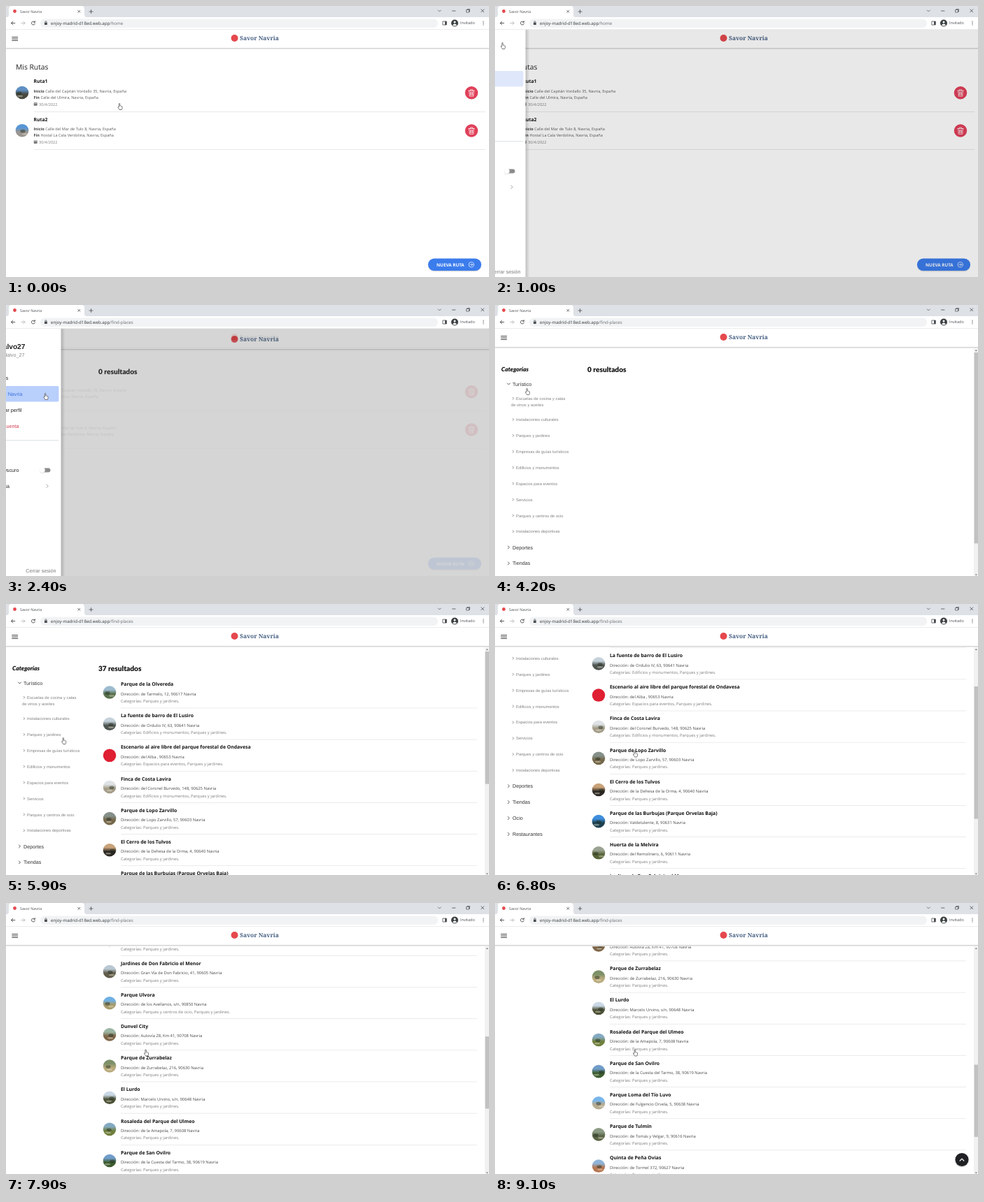
Animation of 690x388 px, one loop 9.2 s. Source, as an HTML page:

```html
<!DOCTYPE html>
<html lang="es">
<head>
<meta charset="utf-8">
<style>
html, body { margin: 0; width: 100%; height: 100%; overflow: hidden; background: #fff; }
svg { display: block; width: 690px; height: 388px; font-family: "Open Sans", "Noto Sans", sans-serif; text-rendering: geometricPrecision; }
.side { font-family: "Liberation Sans", Arial, sans-serif; }
.head { font-family: Lato, sans-serif; font-weight: 900; }
.brand { font-family: "Noto Serif", serif; font-weight: 700; }
.line { fill: none; stroke-linecap: round; stroke-linejoin: round; }
</style>
</head>
<body>
<svg id="stage" viewBox="0 0 690 388" xmlns="http://www.w3.org/2000/svg"></svg>
<script>
const LOOP = 9200;
const CITY = 'Navria';
const APP = 'Savor ' + CITY;
const VIEW = 327, TRACK = 316, ROW = 45.15;

// y is the visual middle of the text
const text = (x, y, str, size, fill = '#222', attrs = '') =>
  `<text x="${x}" y="${(y + size * .36).toFixed(2)}" font-size="${size}" fill="${fill}" ${attrs}>${str}</text>`;
const rect = (x, y, w, h, fill, attrs = '') =>
  `<rect x="${x}" y="${y}" width="${w}" height="${h}" fill="${fill}" ${attrs}/>`;
const circle = (x, y, r, fill, attrs = '') => `<circle cx="${x}" cy="${y}" r="${r}" fill="${fill}" ${attrs}/>`;
const line = (d, stroke, width = .8, attrs = '') =>
  `<path class="line" d="${d}" stroke="${stroke}" stroke-width="${width}" ${attrs}/>`;
const group = (id, body, attrs = '') => `<g id="${id}" ${attrs}>${body}</g>`;
const BOLD = 'font-weight="700" ';

let photoCount = 0;
function photo(x, y, sky, ground) {
  const n = photoCount++, id = 'photo' + n;
  const trees = sky === ground ? '' :
    `<ellipse cx="${x - 4 + n * 5 % 9}" cy="${y + 1}" rx="3.6" ry="2.4" fill="#1d2618" opacity=".45"/>` +
    `<ellipse cx="${x - 3 + n * 7 % 8}" cy="${y + 5}" rx="4" ry="1.3" fill="#f1ead8" opacity=".4"/>`;
  return `<linearGradient id="${id}" x2="0" y2="1"><stop offset=".3" stop-color="${sky}"/>` +
    `<stop offset=".62" stop-color="${ground}"/></linearGradient>` + circle(x, y, 9.3, `url(#${id})`) + trees;
}

function browser() {
  const ink = '#4a4d51';
  return rect(0, 0, 690, 17, '#dee1e6') +
    '<path d="M1 16Q4 16 4 12V4Q4 0 8 0H108Q112 0 112 4V12Q112 16 115 16Z" fill="#fff"/>' +
    rect(0, 16, 690, 18, '#fff') + rect(0, 33.3, 690, .7, '#e4e4e6') +
    circle(12.5, 7.5, 2.4, '#e5484d') + text(20, 7.8, APP, 5.3, '#4a4d51') +
    line('M102.8 6.3l3 3m0-3l-3 3', ink) + line('M119 8h5M121.5 5.5v5', ink) +
    line('M617.3 6l2 2l2-2', ink, .7) + line('M637.5 7h4.5', ink) +
    line('M658 5.5h3.5v3.5h-3.5zM659 5.5v-1h3.5v3.5h-1', ink, .7) +
    line('M678.8 4.8l4 4m0-4l-4 4', ink) +
    line('M12.8 24.5h-5.2m2.3-2.4l-2.4 2.4l2.4 2.4', ink, .9) +
    line('M21.8 24.5h5.2m-2.3-2.4l2.4 2.4l-2.4 2.4', '#b9bbbe', .9) +
    line('M41 23a2.5 2.5 0 1 0 .4 2.2M41.4 21.6v1.7h-1.7', ink, .9) +
    rect(49, 18.5, 568, 12.5, '#f1f3f4', 'rx="6.2"') +
    rect(55, 23.8, 3.8, 3.2, ink, 'rx=".5"') + line('M55.8 23.8v-1a1.1 1.1 0 0 1 2.2 0v1', ink, .7) +
    text(64, 24.5, 'enjoy-madrid-d18ed.web.app<tspan id="path" fill="#686b70"></tspan>', 6.15, '#33363a') +
    line('M624.3 22h5v5h-5z', ink) + rect(627, 22, 2.5, 5, ink) +
    circle(641, 24.5, 5, '#3c4043') + circle(641, 23, 1.5, '#fff') +
    '<path d="M638 27.5q3-4 6 0q-3 2-6 0z" fill="#fff"/>' +
    text(649, 24.5, 'Invitado', 5.5, '#4a4d51') +
    [22.2, 24.5, 26.8].map(y => circle(682, y, .65, ink)).join('');
}

function header() {
  return rect(0, 34, 690, 26.5, '#fff') + rect(0, 60, 690, 1, '#d2d2d2') + rect(0, 61, 690, 1.2, '#ededed') +
    line('M8.7 44.6h8M8.7 47h8M8.7 49.4h8', '#333', .9) +
    circle(326.5, 46, 5, '#e5484d') + text(334, 46.2, APP, 8.4, '#435d80', 'class="brand"');
}

function route(dy, name, from, to, sky, ground) {
  const label = (y, key, value) =>
    text(39.5, y, `<tspan ${BOLD} fill="#444">${key}</tspan> ${value}, ${CITY}, España`, 5.6, '#5c5c5c');
  return `<g transform="translate(0 ${dy})">` + photo(23, 124, sky, ground) +
    text(39.5, 108, name, 6.8, '#111', BOLD) + label(122, 'Inicio', from) + label(131, 'Fin', to) +
    rect(39.7, 138.2, 5, 4.6, '#777', 'rx=".7"') + rect(40.3, 139.4, 3.8, .5, '#fff') +
    text(47, 141, '30/4/2022', 5.6, '#808080') + rect(40, 151, 645, .7, '#dedede') +
    circle(665, 124.3, 9.2, '#e0405a') +
    line('M660.8 121.3h8.4M663.3 121.3v-1.5h3.4v1.5M661.7 121.6l.6 7.5h5.4l.6-7.5M663.6 123.3v4M665 123.3v4M666.4 123.3v4', '#fff', .75) +
    '</g>';
}

function home() {
  return rect(0, 34, 690, 354, '#fff') + text(14, 87, 'Mis Rutas', 10.3, '#222') +
    route(0, 'Ruta1', 'Calle del Capitán Vordallo 35', 'Calle del Ulmira', '#5f8fc4', '#48493f') +
    route(54.2, 'Ruta2', 'Calle del Mar de Tulo 8', 'Hostal La Cala Verdolina', '#5796d6', '#9a958f') +
    rect(603, 362.5, 76, 18, '#000', 'rx="9" opacity=".12"') + rect(603, 361.5, 76, 17.5, '#3b7cec', 'rx="8.7"') +
    text(615, 370.5, 'NUEVA RUTA', 6.3, '#fff', BOLD) +
    line('M668.4 370.3a3.7 3.7 0 1 1-7.4 0a3.7 3.7 0 1 1 7.4 0M662.8 370.3h3.8m-1.5-1.5l1.5 1.5l-1.5 1.5', '#fff', .7) +
    header();
}

const PARK = 'Parques y jardines', BUILT = 'Edificios y monumentos, ';
const EVENTS = 'Espacios para eventos, ', LEISURE = 'Parques y centros de ocio, ';
const places = [
  ['Parque de la Olvereda', 'de Tarmelo, 12, 90617', '', '#9dbbd0', '#58704a'],
  ['La fuente de barro de El Lusiro', 'de Ordulio IV, 63, 90641', BUILT, '#c5d2da', '#4d5450'],
  ['Escenario al aire libre del parque forestal de Ondavesa', 'del Alba , 90653', EVENTS, '#df1f32', '#df1f32'],
  ['Finca de Costa Lavira', 'del Coronel Burvedo, 148, 90625', BUILT, '#dfe3e6', '#a39c88'],
  ['Parque de Lopo Zarvillo', 'de Lopo Zarvillo, 57, 90603', '', '#86908a', '#75684a'],
  ['El Cerro de los Tulvos', 'de la Dehesa de la Orma, 4, 90640', '', '#c9a37a', '#2b2723'],
  ['Parque de las Burbujas (Parque Orvelas Baja)', 'Valdetulente, 8, 90631', '', '#3f8ede', '#1e4150'],
  ['Huerta de la Melvira', 'del Remolinero, 6, 90611', '', '#9aa391', '#566338'],
  ['Jardines de Don Fabricio el Menor', 'Gran Vía de Don Fabricio, 41, 90605', '', '#b9c8d3', '#625c4b'],
  ['Parque Ulvora', 'de los Avellanos, s/n, 90850', LEISURE, '#6fb0e4', '#a79a6a'],
  ['Dunvel City', 'Autovía Z8, Km 41, 90708', '', '#9cb7a4', '#7d6548'],
  ['Parque de Zurrabelaz', 'de Zurrabelaz, 216, 90630', '', '#7d9068', '#b9aa7c'],
  ['El Lurdo', 'Marcelo Urvino, s/n, 90648', '', '#cbd9e6', '#4c5136'],
  ['Rosaleda del Parque del Ulmeo', 'de la Amapola, 7, 90608', '', '#84aac2', '#6f7f3d'],
  ['Parque de San Ovilro', 'de la Cuesta del Tarmo, 38, 90619', '', '#719dcb', '#3d5c30'],
  ['Parque Loma del Tío Luvo', 'de Fulgencio Orvela, 5, 90638', '', '#78b5ea', '#b6ac91'],
  ['Parque de Tulmín', 'de Tomás y Velgar, 9, 90616', '', '#8b9a83', '#586345'],
  ['Quinta de Peña Ovias', 'de Tormel 372, 90627', '', '#8fb4d8', '#b5764f'],
];

const place = ([name, address, extra, sky, ground], i) =>
  `<g transform="translate(0 ${(115 + i * ROW).toFixed(2)})">` + photo(148, 11.5, sky, ground) +
  text(164, -.3, name, 6.85, '#111', BOLD) +
  text(164, 13.5, `Dirección: ${address} ${CITY}`, 5.85, '#484848') +
  text(164, 24, `Categorías: ${extra}${PARK}.`, 5.85, '#7c7c7c') +
  rect(164, 33.6, 509, .7, '#e3e3e3') + '</g>';

const chevron = (x, y, size = 1.8, color = '#444') =>
  line(`M${x - size / 2} ${y - size}l${size} ${size}l${-size} ${size}`, color, .9);

const kinds = ['Instalaciones culturales', PARK, 'Empresas de guías turísticos', 'Edificios y monumentos',
  'Espacios para eventos', 'Servicios', 'Parques y centros de ocio', 'Instalaciones deportivas'];

function sidebar() {
  const grey = '#828282';
  const subs = chevron(26, 133.7, 1.5, grey) + text(30, 133.7, 'Escuelas de cocina y catas', 5.85, grey) +
    text(23, 142.7, 'de vinos y aceites', 5.85, grey) +
    kinds.map((kind, i) => {
      const y = 164 + i * 22.9;
      return chevron(26, y, 1.5, grey) + text(30, y, kind, 5.85, grey);
    }).join('');
  const rest = ['Deportes', 'Tiendas', 'Ocio', 'Restaurantes'].map((kind, i) => {
    const y = 347 + i * 22.9;
    return chevron(19.5, y, 2) + text(25, y, kind, 7.2, '#333');
  }).join('');
  return text(9, 91.8, 'Categorías', 8.5, '#111', 'class="head" font-style="italic"') +
    '<g class="side">' + text(25, 113, 'Turístico', 7.2, '#333') +
    group('closed', chevron(19.5, 113, 2)) + group('opened', line('M17.5 112l2 2l2-2', '#444', .9) + subs) +
    group('rest', rest) + '</g>';
}

function finder() {
  return rect(0, 34, 690, 354, '#fff') +
    '<g clip-path="url(#content)">' + group('scroll', sidebar() +
      text(132, 92.7, '<tspan id="count"></tspan> resultados', 10.1, '#111', 'class="head"') +
      group('firstRows', places.slice(0, 10).map(place).join('')) +
      group('moreRows', places.slice(10).map((p, i) => place(p, i + 10)).join(''))) + '</g>' +
    group('bar', rect(684, 61, 6, 327, '#f1f1f1') + '<path d="M685.8 66l1.5-2l1.5 2z" fill="#777"/>' +
      '<path d="M685.8 385.5l1.5 2l1.5-2z" fill="#777"/>' +
      rect(684.6, 68, 5.4, 100, '#c1c1c1', 'id="thumb"')) +
    group('up', circle(667, 368, 10.3, '#000', 'opacity=".15"') + circle(667, 367.5, 9.5, '#202124') +
      line('M664.2 369l2.8-2.8l2.8 2.8', '#fff', 1.2)) +
    header();
}

function menu() {
  const end = 'text-anchor="end"';
  const item = (x, y, label, fill = '#222', attrs = '') => text(x, y, label, 7.2, fill, attrs + end);
  return rect(109, 34, 6, 354, 'url(#shade)') + rect(0, 34, 109, 354, '#fff') +
    rect(0, 93, 106, 22.5, '#dfe8fb', 'id="routesItem" rx="2"') +
    rect(0, 116, 106, 22.5, '#f3f3f3', 'id="exploreItem" rx="2"') +
    '<g class="side">' +
    text(58, 59, 'Dalvo27', 10.2, '#222', BOLD + end) + item(57, 71.5, '@dalvo_27', '#888') +
    item(34, 104, 'Mis Rutas') + item(54, 127, 'Explorar ' + CITY, '#222', 'id="exploreLabel" ') +
    item(53, 150, 'Modificar perfil') + item(49, 173, 'Borrar cuenta', '#cf3c4f') +
    rect(0, 193.5, 106, .8, '#ccd7dc') + item(30, 214, 'Ajustes', '#888') +
    item(49, 236.5, 'Modo Oscuro') + item(35.5, 259.3, 'Historia') +
    rect(81, 233.4, 13, 6, '#8c8c8c', 'rx="3"') +
    circle(82.5, 236.9, 4, '#000', 'opacity=".15"') + circle(82.5, 236.4, 3.8, '#fff') +
    chevron(89.5, 259.3, 2.3, '#999') + item(102, 380.5, 'Cerrar sesión', '#777') + '</g>';
}

const hand = '<path d="M-1.6 .8V-3.7Q-1.6-4.6-.9-4.6T-.2-3.7V-1Q.5-1.5 1-.7Q1.7-1 2-.3Q3-.5 3 .5V2.2Q2.8 3.4 2.3 4.5H-1Q-1.7 3-2.9 1.5Q-3.3 .4-2.5 .3Z" ' +
  'fill="#fff" stroke="#444" stroke-width=".7" stroke-linejoin="round"/>';

const stage = document.getElementById('stage');
stage.innerHTML =
  '<defs><clipPath id="page"><rect y="34" width="690" height="354"/></clipPath>' +
  '<clipPath id="content"><rect y="61" width="690" height="327"/></clipPath>' +
  '<linearGradient id="shade"><stop stop-opacity=".18"/><stop offset="1" stop-opacity="0"/></linearGradient></defs>' +
  '<g clip-path="url(#page)">' + group('home', home()) + group('finder', finder()) +
  rect(0, 34, 690, 354, '#000', 'id="backdrop"') + group('menu', menu()) + '</g>' +
  browser() + group('cursor', hand);

const el = Object.fromEntries([...stage.querySelectorAll('[id]')].map(n => [n.id, n]));
const set = (id, name, value) => el[id].setAttribute(name, value);
const show = (id, on) => set(id, 'display', on ? 'inline' : 'none');
const move = (id, x, y) => set(id, 'transform', `translate(${x} ${y})`);

const smooth = k => k * k * (3 - 2 * k);
function at(keys, t, ease = k => k) {
  const i = keys.findIndex(k => k[0] > t);
  if (i === 0) return keys[0].slice(1);
  if (i < 0) return keys[keys.length - 1].slice(1);
  const a = keys[i - 1], b = keys[i], k = ease((t - a[0]) / (b[0] - a[0]));
  return a.slice(1).map((v, j) => v + (b[j + 1] - v) * k);
}

// each key: time, value(s)
const pointer = [[50, 163, 144], [600, 11.5, 57], [1050, 11.5, 57], [1800, 57, 131], [2950, 57, 131],
  [3300, 46.5, 124], [4200, 46.5, 124], [5000, 56, 192], [5750, 56, 192], [6300, 200.5, 214.5]];
const menuEdge = [[900, 0], [1000, 43], [1100, 92], [1200, 107], [1250, 109],
  [2280, 109], [2400, 79], [2500, 24], [2600, 0]];
const pageIn = [[2280, 0, 14], [2400, .86, 3], [2460, 1, .8], [2500, 1, 0]];
const scrolling = [[6450, 0], [6800, 86], [7400, 236], [7900, 389.5], [8400, 446],
  [8700, 482], [8800, 482], [9100, 517.5]];

function render(t) {
  const [edge] = at(menuEdge, t), [alpha, dy] = at(pageIn, t), [top] = at(scrolling, t);
  const chosen = t >= 2280, open = t >= 3700, found = t >= 5800, more = top > 200;

  el.path.textContent = chosen ? '/find-places' : '/home';
  show('finder', chosen);
  set('finder', 'opacity', alpha);
  move('finder', 0, dy);
  show('opened', open);
  show('closed', !open);
  move('rest', 0, open ? 0 : -211);
  el.count.textContent = found ? 37 : 0;
  show('firstRows', found);
  show('moreRows', more);
  move('scroll', 0, -top);

  const height = more ? 1000 : found ? 545 : 378;
  show('bar', open);
  set('thumb', 'y', 68 + top / height * TRACK);
  set('thumb', 'height', VIEW / height * TRACK);
  show('up', top > 450);

  show('menu', edge > 0);
  move('menu', edge - 109, 0);
  set('backdrop', 'opacity', .23 * edge / 109);
  show('routesItem', !chosen);
  show('exploreItem', t >= 1700);
  set('exploreItem', 'fill', chosen ? '#b9cffc' : '#f3f3f3');
  set('exploreLabel', 'fill', chosen ? '#3b72dc' : '#222');
  move('cursor', ...at(pointer, t, smooth));
}

const start = performance.now();
function frame() {
  render((performance.now() - start) % LOOP);
  requestAnimationFrame(frame);
}
render(0);
requestAnimationFrame(frame);
</script>
</body>
</html>
```
